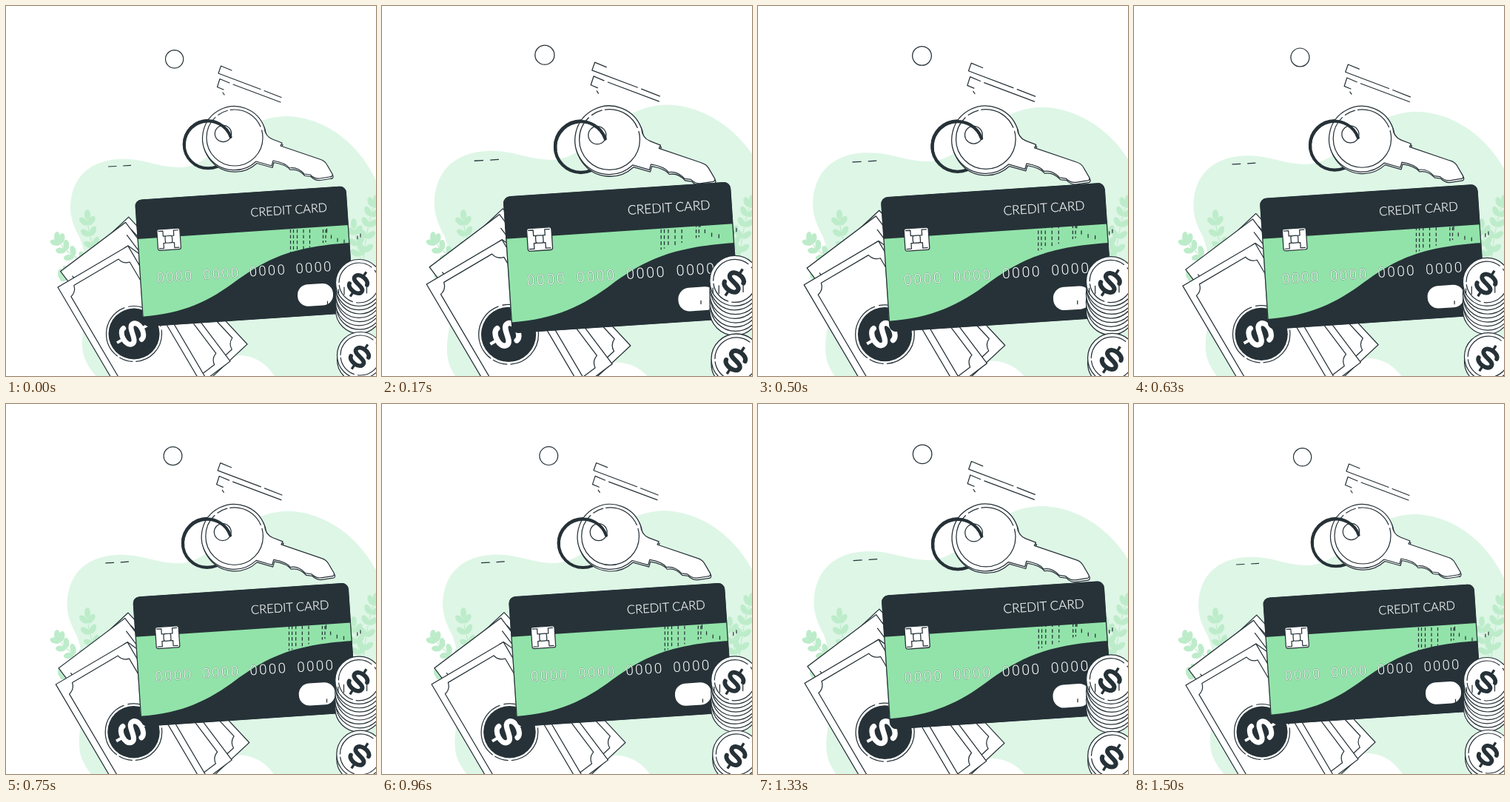
An HTML page that plays this animation: 500 by 500 pixels, repeating every 1540 ms.

```html
<!DOCTYPE html>
<html lang="en">
<head>
<meta charset="utf-8">
<title>Payment items</title>
<style>
html, body { margin: 0; width: 100%; height: 100%; overflow: hidden; background: #fff; }
svg { display: block; width: 100vw; height: 100vh; }
.line { fill: none; stroke: #263238; stroke-width: 1.2; stroke-linecap: round; stroke-linejoin: round; }
.thick { stroke-width: 4; }
.paper { fill: #fff; stroke: #263238; stroke-width: 1.2; stroke-linejoin: round; }
.dark { fill: #263238; }
.green { fill: #92e3a9; }
.leaf { fill: #bdecca; }
.stem { fill: none; stroke: #bdecca; stroke-width: 1.2; }
.title { font: 300 16.2px Lato, "Open Sans", sans-serif; fill: #fff; stroke: #fff; stroke-width: .2; }
.digits { font: 300 18.5px Roboto, Lato, sans-serif; letter-spacing: 2.3px; fill: #fff;
  stroke: #263238; stroke-width: .7; stroke-opacity: .6; paint-order: stroke; }
</style>
</head>
<body>
<svg viewBox="0 0 500 500">
  <defs>
    <clipPath id="face"><rect width="286" height="172" rx="9"/></clipPath>
    <g id="dollar" fill="none" stroke="currentColor" stroke-linecap="round">
      <path stroke-width="6" d="M11-6C10-14-10-15-10-6C-10 2 10-2 10 6C10 15-10 14-11 6"/>
      <path stroke-width="3.4" stroke-linecap="butt" d="M0-12V-21M0 12V21"/>
    </g>
    <g id="coin">
      <circle class="paper" r="31.5"/>
      <circle class="line" r="27" stroke-dasharray="46 5 30 4 60 6"/>
      <use href="#dollar" color="#263238" transform="translate(-1 2) rotate(33) scale(.95)"/>
    </g>
    <g id="bill">
      <path class="paper" d="M0 0H110V-235H0Z"/>
      <path class="line" d="M9-220V-20Q18-18 20-9H90Q92-18 101-20V-220"/>
    </g>
    <path id="keybody" d="M349 164Q350 176 360 180L373 185L371 189L424 207Q431 209 434 215L441 227Q442 231 437 231L424 233Q417 234 411 228L403 227Q394 217 383 219Q378 212 361 209L359 216L338 210A43 43 0 1 1 349 164Z"/>
  </defs>

  <g class="beat" data-at="300 350">
    <path fill="#def6e6" d="M87 272C88 230 115 209 152 207C186 205 205 219 238 218C285 214 314 150 378 149C424 149 476 180 502 240L530 300V530H380C366 505 354 474 316 472C290 472 290 530 200 530C140 530 118 500 108 480C99 461 104 440 108 415C114 382 112 350 100 314C93 301 87 288 87 272Z"/>
  </g>

  <g id="plants"></g>

  <g class="beat" data-at="198 432">
    <use href="#bill" transform="translate(326 457) rotate(-43) translate(-110)"/>
    <use href="#bill" transform="translate(303 480) rotate(-37) translate(-110)"/>
    <path class="paper" d="M160 327L165 324L187 340L178 350Z"/>
    <use href="#bill" transform="translate(70 380) rotate(-30.5) scale(1 -1)"/>
    <circle class="line" cx="173" cy="443" r="37.5" stroke-dasharray="56 5 18 4 80 6"/>
    <circle class="dark" cx="173" cy="443" r="34.5"/>
    <use href="#dollar" color="#fff" transform="translate(171 443) rotate(60) scale(1.15)"/>
  </g>

  <g class="beat" data-at="328 145">
    <circle class="line" cx="227.6" cy="71.8" r="12.1"/>
    <path class="line" d="M305 87L290.500 81L287 91L344 112.500M349 114.500L372 123.500M302 104L289 98.500L285.500 109.500L294 113M307 106L371 130M293 117L295 120"/>
    <circle class="line thick" cx="273" cy="187" r="32.3"/>
    <use href="#keybody" class="paper" x="1" y="2.5"/>
    <use href="#keybody" class="paper"/>
    <circle class="line" cx="309" cy="178" r="38" stroke-dasharray="150 5 14 4 50 5"/>
    <circle class="line" cx="293.5" cy="172.5" r="11.2"/>
    <path class="line thick" d="M241 191A32.300 32.300 0 0 1 303.600 177"/>
  </g>

  <g class="beat" data-at="312 318">
    <path class="line" d="M138.500 217L149 216.500M158.500 216L168.500 215.300"/>
    <g transform="translate(174 262) rotate(-3.8)">
      <g clip-path="url(#face)">
        <rect class="dark" width="286" height="172"/>
        <path class="green" d="M0 53H286V77C205 77 172 92 130 118C92 143 55 158 0 158Z"/>
      </g>
      <rect class="line" x=".6" y=".6" width="284.8" height="170.8" rx="8.5"/>
      <text class="title" x="155" y="33">CREDIT CARD</text>
      <g id="number" class="digits"></g>
      <g transform="translate(27 42)">
        <rect class="paper" width="31" height="28.5" rx="2.5"/>
        <rect class="line" x="10.5" y="9.5" width="9.5" height="9.5" rx="2"/>
        <path id="contact" class="line" d="M2 2.500H8V9.500H10.500M2 26H8V19H10.500"/>
        <use href="#contact" transform="translate(30.5) scale(-1 1)"/>
      </g>
      <rect x="211" y="129.5" width="48" height="29.5" rx="14" fill="#fff"/>
    </g>
  </g>

  <g class="beat" data-at="480 408">
    <path id="dashes" class="line" stroke-dasharray="4.5 3" style="stroke-linecap:butt"/>
    <path id="ticks" class="line"/>
    <g id="stack"></g>
    <use href="#coin" x="477" y="374"/>
    <path class="line" d="M457 380V390M449.500 383V390M487.500 376V388"/>
    <circle class="paper" cx="479" cy="478" r="31.5"/>
    <use href="#coin" x="479" y="472"/>
  </g>
</svg>
<script>
const byId = id => document.getElementById(id);
const repeat = (n, make) => Array.from({ length: n }, (_, i) => make(i)).join('');

// A curved stem from tip to base with leaves in pairs, one at the tip
function plant(tip, bend, base, pairs) {
  const at = u => [0, 1].map(k => (1 - u) ** 2 * tip[k] + 2 * u * (1 - u) * bend[k] + u * u * base[k]);
  const leaf = (x, y, turn) =>
    `<ellipse class="leaf" rx="4" ry="7" cy="-8" transform="translate(${x} ${y}) rotate(${turn})"/>`;
  const pair = i => {
    const u = (i + 1) / (pairs + 1), [x, y] = at(u), [px, py] = at(u - .05);
    const turn = Math.atan2(px - x, y - py) * 180 / Math.PI;
    return leaf(x, y, turn - 42) + leaf(x, y, turn + 42);
  };
  return `<path class="stem" d="M${tip}Q${bend} ${base}"/>` + leaf(tip[0], tip[1] + 8, 0) + repeat(pairs, pair);
}
byId('plants').innerHTML =
  plant([110, 282], [109, 325], [147, 372], 5) +
  plant([69, 312], [80, 343], [142, 356], 5) +
  plant([74, 362], [92, 362], [112, 376], 2) +
  plant([500, 262], [488, 290], [482, 352], 5) +
  plant([470, 294], [474, 325], [482, 352], 3);

byId('number').innerHTML = repeat(4, i => `<text x="${22.5 + i * 62.8}" y="113.5">0000</text>`);
byId('stack').innerHTML = repeat(7, i =>
  `<circle class="paper" cx="${477 + i % 2}" cy="${411 - i * 5.3}" r="31.5"/>`);

// Dashes shorten to the right, ticks follow a shallow arc
byId('dashes').setAttribute('d', [384.5, 388.5, 393.5, 402, 410.5, 428.5, 432]
  .map(x => `M${x} 302v${33 - (x - 384) * .33}`).join(''));
byId('ticks').setAttribute('d', [439.5, 448, 457, 475, 479]
  .map(x => `M${x} ${316 - ((x - 458) / 19) ** 2 * 6.5}v4`).join('') + 'M433.5 301v5M434.5 399v4');

const LOOP = 1540;
const keys = [[0, 1], [250, 1.1], [750, 1.021], [930, 1.021], [1200, 1.09], [1500, 1], [LOOP, 1]];

function scaleAt(t) {
  const i = keys.findIndex(k => k[0] > t);
  const [t0, a] = keys[i - 1], [t1, b] = keys[i];
  return a + (b - a) * (1 - Math.cos(Math.PI * (t - t0) / (t1 - t0))) / 2;
}

const groups = [...document.querySelectorAll('.beat')].map(el => [el, ...el.dataset.at.split(' ').map(Number)]);

function draw(ms) {
  const s = scaleAt(ms % LOOP);
  for (const [el, x, y] of groups)
    el.setAttribute('transform', `translate(${x} ${y}) scale(${s}) translate(${-x} ${-y})`);
}

let start;
function tick(now) {
  start ??= now;
  draw(Math.max(0, now - start));
  requestAnimationFrame(tick);
}
draw(0);
requestAnimationFrame(tick);
</script>
</body>
</html>
```
